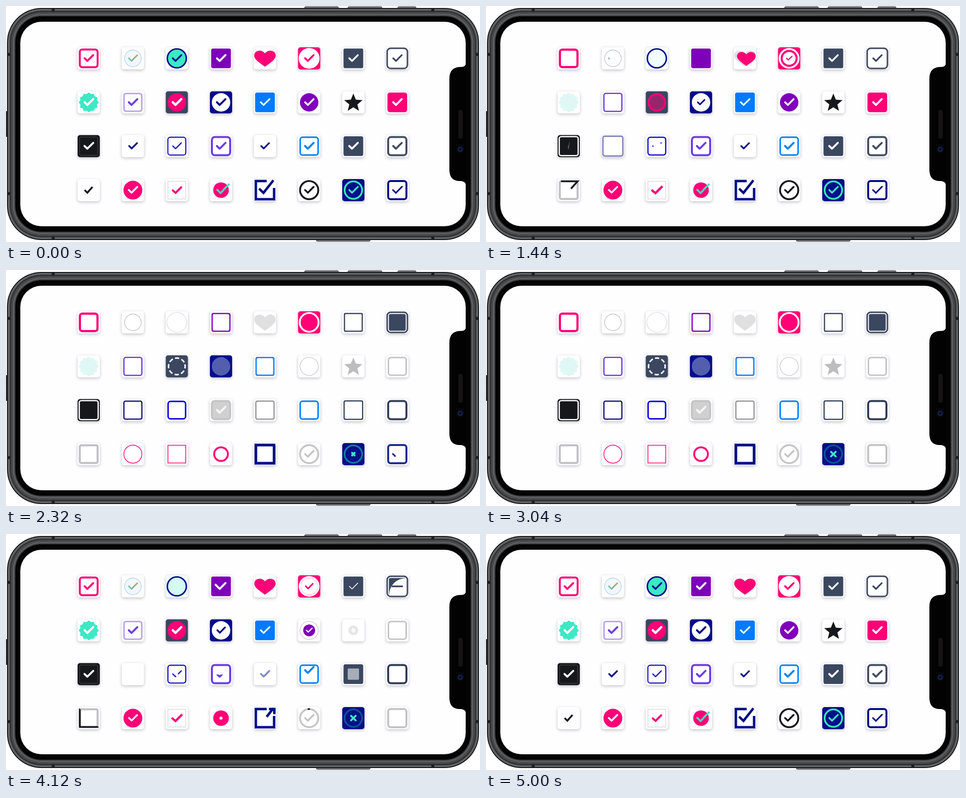
Write an HTML page with a canvas that moves like this. It is 960 px wide and 480 px high and loops after 5.04 s.

```html
<!DOCTYPE html>
<html lang="en">
<head>
<meta charset="utf-8">
<title>Checkboxes</title>
<style>
html, body { margin: 0; width: 100%; height: 100%; overflow: hidden; background: #fff; }
svg, canvas { position: absolute; left: 0; top: 0; width: 960px; height: 480px; display: block; }
</style>
</head>
<body>
<svg viewBox="0 0 960 480">
  <g fill="#77787a" stroke="#343436">
    <rect x="604.5" y="1.5" width="69" height="8" rx="2"/>
    <rect x="692.5" y="1.5" width="69" height="8" rx="2"/>
    <rect x="793.5" y="1.5" width="37" height="8" rx="2"/>
    <rect x="628.5" y="470" width="109" height="8.5" rx="2"/>
  </g>
  <path d="M1 214v52" stroke="#333" stroke-width="2"/>
  <rect x="2" y="4" width="956" height="472" rx="70" fill="#151516"/>
  <rect x="4" y="6" width="952" height="468" rx="68" fill="#6b6c6e"/>
  <rect x="6" y="8" width="948" height="464" rx="66" fill="#58595b"/>
  <rect x="8" y="10" width="944" height="460" rx="64" fill="#2a2a2b"/>
  <rect x="10" y="12" width="940" height="456" rx="62" fill="#48494b"/>
  <rect x="14" y="16" width="932" height="448" rx="58" fill="#5d5e60"/>
  <rect x="17" y="19" width="926" height="442" rx="55" fill="#39393a"/>
  <rect x="19" y="21" width="922" height="438" rx="53" fill="#040404"/>
  <path d="M95.500 5v6M864.500 5v6M95.500 469v6M864.500 469v6M2 98.500h6M2 381.500h6M952 98.500h6M952 381.500h6"
    stroke="#1c1c1d" stroke-width="6"/>
  <rect x="29" y="32" width="902" height="416" rx="43" fill="#fefdff"/>
  <path d="M932 115Q931 124 922 124H919Q898 125 898 148V333Q898 356 919 356H922Q931 357 932 366Z" fill="#020202"/>
  <rect x="916" y="211" width="9" height="59" rx="4.500" fill="#151313"/>
  <circle cx="920" cy="291.500" r="7" fill="#0b0d1c"/>
  <circle cx="920" cy="291.500" r="3.800" fill="#03040a" stroke="#1d3273" stroke-width="1.500"/>
</svg>
<canvas id="stage" width="960" height="480"></canvas>
<script>
const c = document.getElementById('stage').getContext('2d');
const LOOP = 5040, OFF_AT = 900, ON_AT = 3230, LAG = 105;
const PINK = '#ff0077', TEAL = '#3de8c4', NAVY = '#000f86', PURPLE = '#7e00bb', VIOLET = '#6c3be6',
  SLATE = '#3a475f', BLUE = '#007bff', BLACK = '#17181c', GRAY = '#c4c4c4', WHITE = '#ffffff';

const clamp = x => Math.max(0, Math.min(1, x));
const seg = (v, a, b) => { const x = clamp((v - a) / (b - a)); return x * x * (3 - 2 * x); };
const rgb = h => [1, 3, 5].map(i => parseInt(h.slice(i, i + 2), 16));
const mix = (a, b, k) => {
  const p = rgb(a), q = rgb(b);
  return `rgb(${p.map((x, i) => Math.round(x + (q[i] - x) * k))})`;
};

function fade(alpha, draw) {
  if (alpha <= 0) return;
  c.save();
  c.globalAlpha *= alpha;
  draw();
  c.restore();
}
function paint(fill, stroke, w) {
  if (fill) { c.fillStyle = fill; c.fill(); }
  if (stroke) { c.strokeStyle = stroke; c.lineWidth = w; c.stroke(); }
}
// Sizes are outer sizes; strokes lie inside them.
function box(size, r, fill, stroke, w = 0) {
  const s = size - w;
  if (s <= 0) return;
  c.beginPath();
  c.roundRect(-s / 2, -s / 2, s, s, r);
  paint(fill, stroke, w);
}
function disc(r, fill, stroke, w = 0) {
  if (r <= w / 2) return;
  c.beginPath();
  c.arc(0, 0, r - w / 2, 0, 7);
  paint(fill, stroke, w);
}
function line(pts, col, w, dash = [], cap = 'round', from = 0) {
  c.save();
  c.beginPath();
  pts.forEach(p => c.lineTo(...p));
  c.lineCap = cap;
  c.lineJoin = cap === 'round' ? 'round' : 'miter';
  c.setLineDash(dash);
  c.lineDashOffset = -from;
  paint(null, col, w);
  c.restore();
}
const TICK = [[-8.3, -.3], [-2.7, 5.2], [9, -6.6]], LEN = 24.6;
function tick(col, w, scale = 1, dash, cap, pts = TICK) {
  if (scale < .03) return;
  c.save();
  c.scale(scale, scale);
  line(pts, col, w, dash, cap);
  c.restore();
}
function drawTick(col, w, k) { if (k > .01) tick(col, w, 1, [k * LEN, 99]); }
// Solid box whose white hole closes as it fills.
function filled(col, size, r, k) {
  box(size - 1.5 * (1 - k), r, col);
  box((size - 6.5) * (1 - k), r - 1.5, WHITE);
}
function spikes(n, R, r, fill, dy = 0) {
  c.beginPath();
  for (let i = 0; i < n * 2; i++) {
    const a = i * Math.PI / n - Math.PI / 2, q = i % 2 ? r : R;
    c.lineTo(q * Math.cos(a), q * Math.sin(a) + dy);
  }
  c.closePath();
  paint(fill);
}
function heart(fill) {
  c.beginPath();
  c.moveTo(0, 17);
  c.bezierCurveTo(-8, 11, -21.8, 3, -21.8, -5.5);
  c.bezierCurveTo(-21.8, -17, -6, -19, 0, -10);
  c.bezierCurveTo(6, -19, 21.8, -17, 21.8, -5.5);
  c.bezierCurveTo(21.8, 3, 8, 11, 0, 17);
  paint(fill);
}

// Each entry: draw(v, up), where v runs from 0 (off) to 1 (on); then
// off/on durations and shifts in ms.
const icons = [
  // first row
  [(v, up) => {
    box(40, 5, null, PINK, 4.4 - .5 * v);
    if (up) return drawTick(PINK, 4, seg(v, .2, 1));
    fade(seg(v, 0, .5), () => tick(PINK, 4, 1, [v ** 4 * LEN, 5, .1, 5, .1, 5, .1, 5, .1, 99]));
  }],
  [v => {
    disc(17.5, mix(WHITE, '#f1f6fc', v), mix('#b9b9bb', '#a5cdf0', v), 1.2);
    const g = c.createLinearGradient(-8, 0, 9, 0);
    g.addColorStop(0, '#69c4a4');
    g.addColorStop(.45, '#8fae84');
    g.addColorStop(1, '#c3a273');
    drawTick(g, 3, seg(v, 0, 1));
  }],
  [(v, up) => {
    const ring = up ? seg(v, 0, .55) : seg(v, 0, .5), k = up ? seg(v, .65, 1) : seg(v, .5, 1);
    const glow = 4 * k * (1 - k);
    fade(glow * .35, () => box(48, 9, '#c5f3ec'));
    disc(21, null, '#e2e2e3', 3.4);
    if (ring === 1) disc(21, WHITE);
    disc(19.5, mix(WHITE, TEAL, k));
    c.beginPath();
    c.arc(0, 0, 19.3, 0, ring * Math.PI * 2);
    if (ring) paint(null, '#001089', 3);
    tick(NAVY, 3.6, seg(v, .82, 1));
  }, 800, 900],
  [(v, up) => {
    filled(PURPLE, 40, 4, seg(v, 0, .5));
    const q = clamp((v - .5) / .5), leg = up ? .7 * Math.sin(Math.PI * q) : 0;
    tick(WHITE, 4, up ? seg(q, 0, .4) : seg(v, .55, 1), [], 'round',
      [[-8.3 - 4 * leg, -5 * leg], TICK[1], TICK[2]]);
  }, 500, 800],
  [(v, up) => {
    const k = seg(v, 0, 1);
    heart('#e0e0e1');
    c.translate(up ? 0 : (1 - k) * 22, up ? 0 : (1 - k) * 5);
    c.scale(k, k);
    if (k) heart(PINK);
  }, 540],
  [v => {
    const k = seg(v, 0, 1);
    box(45, 5, PINK);
    disc(21, null, WHITE, 3.8);
    disc(20.8 * k, WHITE);
    tick(PINK, 3.8, k);
  }, 400, 500, -150],
  [v => {
    filled(SLATE, 40, 3, seg(v, 0, .45));
    tick(WHITE, 3.6 * seg(v, .45, .9) + .01);
  }, 300, 400],
  [(v, up) => {
    const R = 49 * seg(v, 0, .5), k = seg(v, .4, 1);
    box(44, 7, WHITE, SLATE, 3);
    box(34, 3, SLATE);
    c.save();
    c.beginPath();
    c.roundRect(-18, -18, 36, 36, 4);
    c.clip();
    c.beginPath();
    c.arc(17, 17, R, 0, 7);
    paint(WHITE);
    c.restore();
    const flat = [[-10, 0], [-2, 0], [10, 0]];
    if (up && v > .22) tick(SLATE, 3.4, 1, [], 'round', TICK.map((p, i) => p.map((x, j) => flat[i][j] + (x - flat[i][j]) * k)));
    if (!up) tick(SLATE, 3.4, seg(v, .5, 1));
  }, 315, 500],
  // second row
  [v => {
    spikes(12, 20.3, 17.4, mix('#dff7f5', TEAL, seg(v, .25, 1)));
    tick(WHITE, 4.4, seg(v, .4, 1));
  }],
  [v => {
    box(39, 4, null, mix(VIOLET, '#b9a2f1', v), 2.6 + .5 * v);
    drawTick(VIOLET, 4, seg(v, .2, 1));
  }, 300],
  [v => {
    box(45, 5, SLATE);
    fade(1 - seg(v, .1, .5), () => {
      const n = 2 * Math.PI * 16.9 / 8;
      c.rotate(-.25);
      c.setLineDash([n * .64, n * .36]);
      disc(18.4, null, WHITE, 3);
    });
    fade(seg(v, .1, .6), () => disc(18.7, PINK));
    fade((1 - seg(v, .3, .95)) * seg(v, .1, .3), () => disc(15, SLATE));
    tick(WHITE, 4.6, seg(v, .6, 1));
  }],
  [v => {
    box(45, 5, NAVY);
    fade(.33 + .67 * seg(v, 0, .9), () => disc(18.7, WHITE));
    tick(NAVY, 4, seg(v, .4, 1));
  }],
  [(v, up) => {
    filled(BLUE, 40, 4, seg(v, 0, .5));
    const over = up ? .35 * Math.sin(Math.PI * clamp((v - .4) / .6)) : 0;
    tick(WHITE, 3, (1.05 + over) * seg(v, .4, .8));
  }, 370],
  [v => {
    const k = seg(v, 0, 1);
    disc(19, null, '#c9b6d3', 1.1);
    c.scale(k, k);
    if (k) disc(18.5, PURPLE);
    if (k) tick(WHITE, 3.6);
  }, 290, 380],
  [(v, up) => {
    const star = (s, col) => {
      c.save();
      c.scale(s, s);
      spikes(5, 19.5, 8.6, col, 1.5);
      c.restore();
    };
    if (!up) return star(1, mix('#bdbdbe', BLACK, v));
    if (v < .15) star(1 - seg(v, 0, .15), '#bdbdbe');
    const r = 20 * seg(v, .05, .45);
    fade(1 - seg(v, .45, .8), () => { disc(r, '#e5e5e6'); disc(r * .45, '#f8f8f8'); });
    if (v > .45) star(seg(v, .45, .9), BLACK);
  }, 340, 500],
  [v => {
    box(39, 5, null, GRAY, 3);
    fade(seg(v, .4, 1), () => box(40, 5, PINK));
    drawTick(WHITE, 4, seg(v, .73, 1));
  }],
  // third row
  [v => {
    box(45, 5, BLACK);
    fade(1 - seg(v, .45, 1), () => box(41, 4, null, WHITE, 2.6));
    fade(seg(v, .5, 1), () => box(38, 3, null, '#49494d', 1));
    fade(seg(v, .2, .8), () => {
      c.scale(seg(v, .3, 1) + .02, 1);
      tick(WHITE, 4);
    });
  }],
  [(v, up) => {
    const out = up ? seg(v, 0, .45) : seg(v, .4, 1);
    fade(1 - out, () => box(39 + 9 * out, 3 + out, null, '#17177f', 2.6));
    tick(NAVY, 3.8, .92 * seg(v, .65, 1));
  }, 500, 1000],
  [v => {
    box(38.5, 5, null, mix('#0a00d8', '#190fbe', v), 3 - .8 * v);
    const k = seg(v, .5, 1);
    if (k) tick('#190fbe', 2.4, 1, [k * LEN / 2, (1 - k) * LEN, k * LEN / 2, 99]);
  }, 500, 500, -150],
  [(v, up) => {
    const on = seg(v, 0, .3), col = mix(GRAY, VIOLET, on);
    box(41, 6, mix('#d0d0d1', WHITE, on), col, 4);
    if (!up || v === 0) fade(1 - on, () => tick('#f6f6f6', 4));
    const k = seg(v, .3, 1);
    c.beginPath();
    c.rect(-16, 8 - 18 * k, 32, 18 * k);
    c.clip();
    tick(VIOLET, 4);
  }, 350, 500],
  [v => {
    fade(1 - seg(v, 0, .4), () => box(39, 3, null, '#8c8c8e', 2.2));
    fade(seg(v, 0, .8), () => tick(NAVY, 4 - .4 * v, 1 - .08 * v));
  }, 300, 500],
  [v => {
    box(39.5, 5, null, '#0a84f0', 3.2);
    c.beginPath();
    c.rect(-18, -18, 36, 36);
    c.clip();
    const k = seg(v, 0, .4);
    c.translate(0, -14 * (1 - k));
    if (k) fade(seg(v, 0, .12), () => tick('#0a84f0', 4));
  }, 165, 500],
  [v => {
    box(40, 4, SLATE);
    fade(1 - 1.6 * v, () => box(35 * (1 - seg(v, 0, .7)), 2, WHITE));
    tick(WHITE, 4, seg(v, .7, 1));
  }, 300, 500, 0, -150],
  [v => {
    box(41, 6, null, mix('#2f3b55', '#434e64', v), 4);
    drawTick('#434e64', 4, seg(v, .2, 1));
  }],
  // fourth row
  [v => {
    const head = 183.5 * seg(v, 0, 1), tail = Math.max(0, head - 24 - 50 * Math.sin(Math.PI * v));
    fade(1 - seg(v, .85, 1), () => box(40, 3, null, '#bfbfc0', 4));
    if (head > 0) line([[18, -18], [18, 18], [-18, 18], [-18, -18], [18, -18], TICK[1], TICK[0]],
      BLACK, 3.7, [head - tail, 999], 'butt', tail);
  }, 650, 860],
  [v => {
    const k = seg(v, 0, .55);
    c.save();
    c.beginPath();
    c.arc(0, 0, 19, 0, 7);
    c.clip();
    c.translate(0, 38 * (1 - k));
    disc(19, PINK);
    c.restore();
    disc(19, null, PINK, 1.4);
    tick(WHITE, 3.7, seg(v, .6, 1));
  }, 700, 400],
  [v => {
    box(37.5, 0, null, mix(PINK, '#dcdcde', seg(v, 0, .8)), 1.5);
    tick(PINK, 4, seg(v, 0, .6) * (1 + .3 * Math.sin(Math.PI * v)), [], 'butt',
      [[-9.5, -.5], [-2.5, 5.5], [10, -7]]);
  }, 500, 300, -150],
  [v => {
    const hole = 12 * (1 - seg(v, 0, .5));
    disc(15.8, PINK);
    disc(hole, WHITE);
    const k = seg(v, .45, 1);
    if (k) line([[-9, -2], [-1, 6], [17, -13]], '#45dcc0', 3.8, [k * 38, 99], 'butt');
  }, 250, 500],
  [(v, up) => {
    const gap = seg(v, 0, .2), k = up ? seg(v, 0, .5) : seg(v, .5, 1);
    const edge = [[18.5 - 15 * gap, -18.5], [-18.5, -18.5], [-18.5, 18.5], [18.5, 18.5], [18.5, -18.5 + 14 * gap]];
    line(edge, NAVY, 5, [], 'butt');
    if (!gap) box(42, 0, null, NAVY, 5);
    if (up && v > 0 && v < .4) line([[8, -18.5], [19, -18.5], [19, -8]], NAVY, 5, [], 'butt');
    if (k) line([[17, -20], [-3, 5.5], [-12, -3]], NAVY, 5, [k * 46, 99], 'butt');
  }, 300, 500, 0, -60],
  [(v, up) => {
    const arc = seg(v, up ? 0 : .2, 1);
    disc(20.3, null, GRAY, 3.7);
    tick(mix(GRAY, BLACK, up ? seg(v, .6, 1) : seg(v, .1, .35)), 3.7);
    c.beginPath();
    c.arc(0, 0, 18.5, -Math.PI / 2, -Math.PI / 2 - Math.max(arc, .01) * Math.PI * 2, true);
    c.lineCap = 'round';
    if (v > 0) paint(null, BLACK, 3.7);
  }, 500, 500, -250, -70],
  [v => {
    box(45, 5, NAVY);
    disc(19.5, null, mix('#08529a', TEAL, v), 3.5);
    const s = 4.7 * (1 - seg(v, 0, .5));
    if (s > .1) [1, -1].forEach(d => line([[-s, -s * d], [s, s * d]], TEAL, 4));
    tick(TEAL, 3.5, seg(v, .5, 1));
  }],
  [v => {
    box(41, 5, null, mix(GRAY, NAVY, seg(v, 0, .6)), 4);
    c.scale(1.07, 1.07);
    drawTick(NAVY, 3, seg(v, .2, 1));
  }]
];

function tile() {
  c.save();
  c.shadowColor = 'rgba(0,0,0,.24)';
  c.shadowBlur = 6;
  c.shadowOffsetY = 2;
  box(45, 5, WHITE);
  c.restore();
}

const snap = x => Math.round(x * 2) / 2;

function render(t) {
  c.clearRect(0, 0, 960, 480);
  icons.forEach(([draw, off = 500, on = 500, offShift = 0, onShift = 0], i) => {
    const col = i % 8, row = i >> 3, lag = LAG * (col + 1.3 * row);
    const since = t - ON_AT - lag - onShift, up = since >= 0;
    const v = up ? clamp(since / on) : 1 - clamp((t - OFF_AT - lag - offShift) / off);
    c.save();
    c.translate(snap(167.5 + 89.3 * col), snap(106.5 + 89.3 * row));
    tile();
    draw(v, up);
    c.restore();
  });
}

const begin = performance.now();
function frame() {
  render((performance.now() - begin) % LOOP);
  requestAnimationFrame(frame);
}
frame();
</script>
</body>
</html>
```
